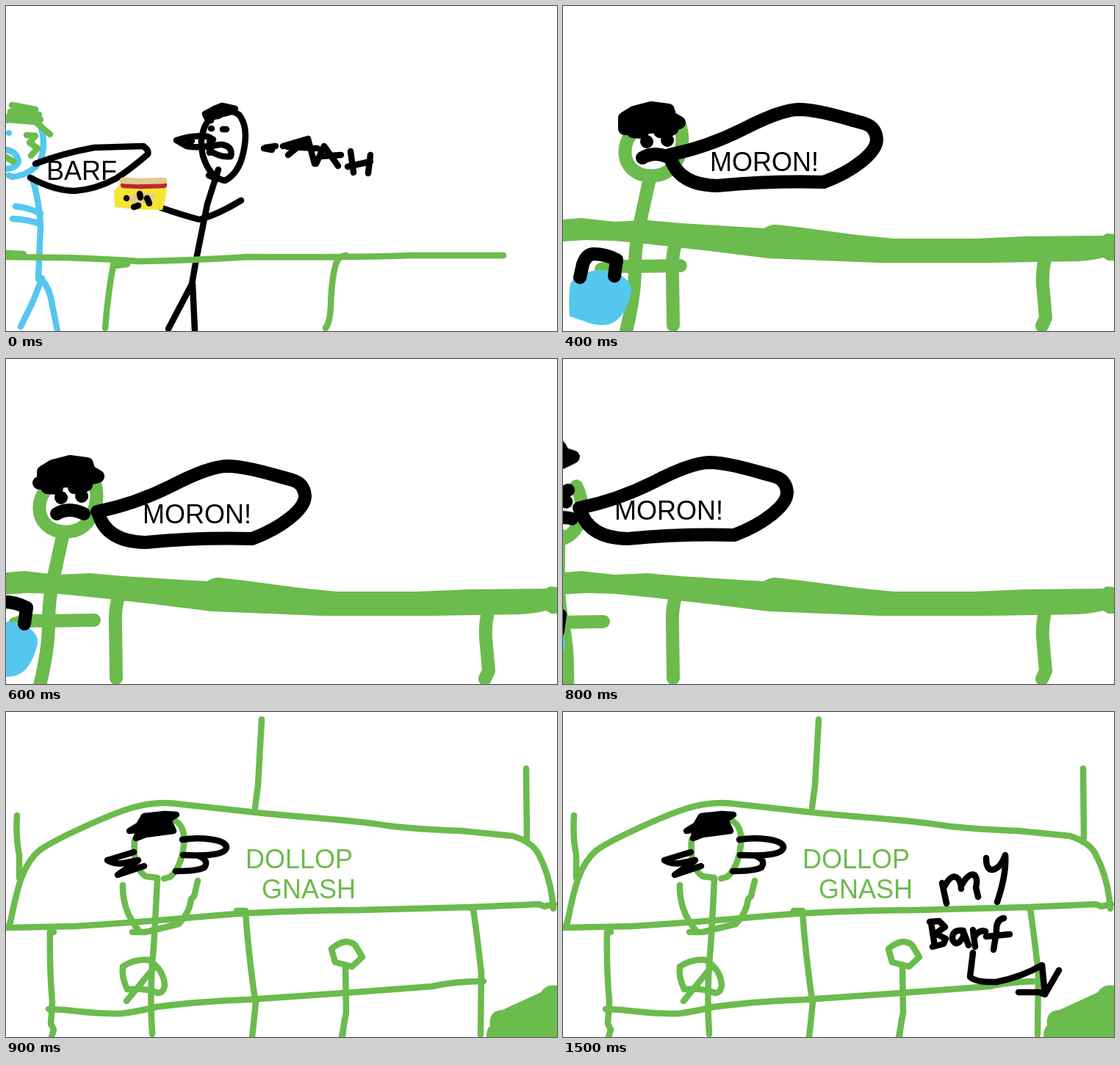
These frames come from a looping animation (750 px wide and 443 px high, 1800 ms). An HTML page without scripts:

```html
<!DOCTYPE html>
<html lang="en">
<head>
<meta charset="utf-8">
<title>Lunch table</title>
<style>
  html, body { margin: 0; width: 100%; height: 100%; overflow: hidden; background: #fff; }
  svg { display: block; width: 750px; height: 443px; }
  path { fill: none; stroke-linecap: round; stroke-linejoin: round; }
  text { font: 36px "Liberation Sans", Arial, sans-serif; }
  .green { stroke: #6cbb4d; }
  .blue { stroke: #55c7ef; }
  .black { stroke: #000; }
  .thin { stroke-width: 8.5px; }
  .thick { stroke-width: 18px; }
  .fg { fill: #6cbb4d; }
  .fb { fill: #55c7ef; }
  .fk { fill: #000; }
  .bread { fill: #e4cb8d; }
  .cheese { fill: #f5e533; }

  .scene, .move { animation: 1.8s step-end infinite; }
  .move { transform-box: view-box; transform-origin: 0 0; }
  #table { animation-name: table; }
  #aisle { animation-name: aisle; }
  #cafe { animation-name: cafe; }
  @keyframes table { 0% { visibility: visible } 22.22%, 100% { visibility: hidden } }
  @keyframes aisle { 0% { visibility: hidden } 22.22% { visibility: visible } 50%, 100% { visibility: hidden } }
  @keyframes cafe { 0% { visibility: hidden } 50%, 100% { visibility: visible } }

  .wobble { animation-name: wobble; }
  @keyframes wobble { 0% { transform: none } 11.11%, 100% { transform: translate(-1px, 1px) } }

  .man { animation-name: man; transform-origin: 86px 443px; }
  .head { animation-name: head; }
  .hair { animation-name: hair; }
  .arm { animation-name: arm; }
  .bag { animation-name: bag; }
  .grip { animation-name: grip; }
  .bubble { animation-name: bubble; }
  .word { animation-name: word; }
  @keyframes man {
    0% { transform: none }
    33.33% { transform: translate(-40px, 2px) }
    38.88% { transform: translate(-60px, 3px) rotate(-6deg) }
    44.44%, 100% { transform: translate(-80px, 5px) rotate(-12deg) }
  }
  @keyframes head {
    0% { transform: none }
    33.33% { transform: translate(1px, 2px) }
    38.88% { transform: translate(-2px, 6px) }
    44.44%, 100% { transform: translate(-5px, 12px) }
  }
  @keyframes hair {
    0% { transform: none }
    33.33% { transform: translate(6px, -3px) }
    38.88% { transform: translate(6px, -17px) }
    44.44%, 100% { transform: translate(6px, -34px) }
  }
  @keyframes arm {
    0% { transform: none }
    33.33% { transform: translate(-40px, 2px) }
    38.88% { transform: translate(-72px, 3px) }
    44.44%, 100% { transform: translate(-105px, 4px) }
  }
  @keyframes bag {
    0% { transform: none }
    33.33% { transform: translate(-50px, -2px) }
    38.88% { transform: translate(-70px, -1px) }
    44.44%, 100% { transform: translate(-90px, 0) }
  }
  @keyframes grip {
    0% { transform: none }
    33.33% { transform: translate(-45px, -7px) }
    38.88% { transform: translate(-61px, -2px) }
    44.44%, 100% { transform: translate(-77px, 3px) }
  }
  @keyframes bubble {
    0% { transform: none }
    33.33% { transform: translate(-20px, 5px) }
    38.88% { transform: translate(-71px, 3px) }
    44.44%, 100% { transform: translate(-122px, 0) }
  }
  @keyframes word {
    0% { transform: none }
    33.33% { transform: translate(-14px, -1px) }
    38.88% { transform: translate(-72px, -3px) }
    44.44%, 100% { transform: translate(-130px, -6px) }
  }

  #note { animation-name: note; }
  .chew { animation-name: chew; }
  @keyframes note { 0% { visibility: hidden } 72.22%, 100% { visibility: inherit } }
  @keyframes chew {
    0% { transform: none }
    72.22% { transform: translate(0, -1px) }
    83.33%, 100% { transform: none }
  }
</style>
</head>
<body>
<svg viewBox="0 0 750 443">

  <g id="table" class="scene">
    <g class="move wobble thin">
      <!-- sick diner -->
      <path class="blue" d="M0 156H1M47 163Q55 188 47 210Q36 230 8 233L4 231M36 235Q46 270 47 300L44 372M49 371L37 402 20 437M48 372Q60 385 63 408L70 443M13 273Q32 275 47 283M9 290Q30 291 47 297"/>
      <circle class="fb" cx="4" cy="173" r="4"/>
      <path class="blue" d="M0 196Q14 198 17 211Q15 221 0 222"/>
      <path class="green" d="M8 135L40 141 6 144 45 148 4 150 47 155 4 155 40 158 60 175M28 176L40 177 32 186 43 194 34 204M0 206L10 212"/>
    </g>
    <g class="move wobble thin">
      <!-- second diner -->
      <path class="black" d="M289 150C270 150 262 180 268 204Q277 234 298 238Q317 228 323 200Q331 165 317 148Q303 139 291 149"/>
      <path class="black fk" d="M271 147L284 140 294 136 312 140 304 145 280 151 273 152Z"/>
      <path class="black" d="M278 156H279M279 167H280M295 168H300M232 183Q255 175 275 178L282 182 277 185M232 183L246 191Q262 194 281 190M248 183L253 184M277 200Q276 188 295 189Q309 192 306 205Q292 207 277 197"/>
      <path class="black" d="M276 231L287 236M289 223L274 270 259 345 253 379 221 440M254 379L257 443M211 275Q240 285 263 291Q287 285 320 265"/>
      <path class="black" d="M351 194L362 196M353 193L367 191M377 191L411 181 384 203M411 181L420 215M383 192L424 194M422 215L433 191 452 218M428 205L456 203M469 198L473 227M496 203L493 228M465 219L496 212"/>
      <path class="black" d="M40 215Q76 201 120 193L187 191Q195 197 193 202Q170 222 150 235Q122 250 94 252Q66 252 33 234"/>
      <!-- sandwich -->
      <path class="cheese" d="M147 253L154 244 219 248 217 262 213 278 172 277 148 274Z"/>
      <path class="bread" d="M165 260Q175 253 203 256L201 263 191 269 170 268Z"/>
      <path stroke="#b92a2e" d="M160 244L183 245 215 244"/>
      <path stroke="#e4cb8d" d="M159 238L180 239 215 238"/>
      <path class="black" d="M164 262H164.1M182 256L183 261M192 262L195 269M174 274L180 272"/>
    </g>
    <path class="move wobble thin green" d="M0 337L24 338M0 342L80 343Q145 345 180 348Q250 347 330 342Q460 343 550 340L677 340M147 348Q139 388 135 439M148 354L165 352M463 340Q452 341 449 352Q443 372 442 410Q441 431 435 439"/>
    <text x="55" y="237">BARF</text>
  </g>

  <g id="aisle" class="scene">
    <path class="fg" d="M0 291L25 289 70 294 115 292 160 296 274 303Q280 298 290 298L325 302 400 312 450 317 560 317 630 314 735 313 740 310 750 311V347H742L735 343Q720 347 700 348L580 350 430 350 280 344 200 334 120 325 70 320 30 319 0 321Z"/>
    <path class="green thick" d="M153 325Q148 340 149 365L150 435M656 345Q652 362 653 380L657 425 652 436"/>
    <path class="move arm green thick" d="M52 359Q65 354 90 355L160 354"/>
    <g class="move man thick">
      <path class="green" d="M118 235L106 290Q99 320 98 350Q99 390 86 443"/>
      <g class="move head">
        <path class="green" d="M97 170C77 190 81 222 108 230C136 236 150 223 157 207Q166 186 160 165"/>
        <path class="black" d="M84 165H85M95 171L108 172M132 171L148 168M114 185H114.1M142 183H142.1M108 207Q125 197 145 207"/>
        <g class="move hair">
          <path class="black fk" d="M84 153L97 145 120 139 143 142 146 152 158 159 142 163 105 166 84 167Z"/>
        </g>
      </g>
    </g>
    <path class="move bag fb" d="M10 378Q30 355 70 362Q95 374 93 390Q84 428 62 434Q45 437 30 430L9 423Q7 400 10 378Z"/>
    <path class="move grip black thick" d="M23 370L27 352Q32 338 42 338Q58 338 73 346L70 368"/>
    <path class="move bubble black thick" d="M144 203Q195 193 245 168Q295 142 320 141C350 141 390 155 410 160Q426 165 427 182C427 200 395 225 355 240Q285 238 210 245Q155 244 145 203"/>
    <text class="move word" x="200" y="225">MORON!</text>
  </g>

  <g id="cafe" class="scene">
    <g class="green thin">
      <path d="M0 294L5 290C13 258 17 213 45 189C65 174 140 140 170 131Q205 120 240 126L350 138C420 145 470 147 520 155Q560 160 620 162L690 169Q715 177 724 192Q742 225 745 268"/>
      <path d="M15 141Q13 170 18 195V226M348 10L343 100 339 130M708 77L709 172"/>
      <path d="M0 294L95 292Q200 285 290 277Q360 271 480 270L633 266 725 262 733 265 746 262"/>
      <path d="M65 300L60 299Q59 350 63 395L61 425 65 433 62 443M314 271H326Q329 320 338 385L340 395 337 425 335 443M630 266L636 268Q642 310 647 355L646 440"/>
      <path d="M58 405L80 406Q130 412 158 411Q180 408 205 402Q265 394 330 392L460 383 580 374Q610 367 650 367"/>
      <path d="M206 227Q204 270 201 320Q195 380 199 439M175 174Q172 212 190 224L206 226M228 147Q245 155 242 182Q238 213 223 225L215 227"/>
      <path d="M159 236Q158 270 180 297M172 300H190L235 289Q250 274 252 255L256 251 261 230"/>
      <path d="M164 394L201 349M165 378Q157 361 159 347Q175 336 194 338Q215 351 216 373Q214 383 207 383Q190 376 165 378"/>
      <path d="M443 323Q453 314 463 313Q473 314 476 319L485 334 471 347 448 341ZM462 345L463 410 457 443M461 418L458 443"/>
    </g>
    <path class="fg" d="M654 443Q654 431 659 428Q656 407 676 406L728 382Q735 370 750 373V443Z"/>
    <text class="fg" x="326" y="213">DOLLOP</text>
    <text class="fg" x="348" y="254">GNASH</text>
    <g class="move chew black thin">
      <path class="fk" d="M168 162L181 154 188 142 216 139 232 140 221 147 228 162 190 167 177 172 182 160Z"/>
      <path d="M174 191L138 202Q148 208 160 206L180 202 152 222 188 210M240 174C262 170 301 173 300 185C298 196 265 196 241 195M262 196Q277 202 270 212Q260 217 231 217"/>
    </g>
    <g id="note" class="scene">
      <path class="move chew black thin" d="M522 261L516 233M518 240Q527 222 535 225Q542 229 542 241M542 237Q552 219 560 222Q565 228 562 239L565 252M576 199Q576 215 584 215Q595 214 602 195Q604 220 591 259M501 287L506 319M499 286L512 285 520 293 507 302 521 309 518 316 503 320M545 298Q529 296 530 310Q536 322 545 306V299L552 318M558 297L561 320M559 308Q566 296 575 299M600 281Q589 283 590 300L586 324M576 306L608 303M558 328L554 361Q562 369 590 368Q625 361 652 345L656 385 675 352M656 385L648 382H620"/>
    </g>
  </g>
</svg>
</body>
</html>
```
